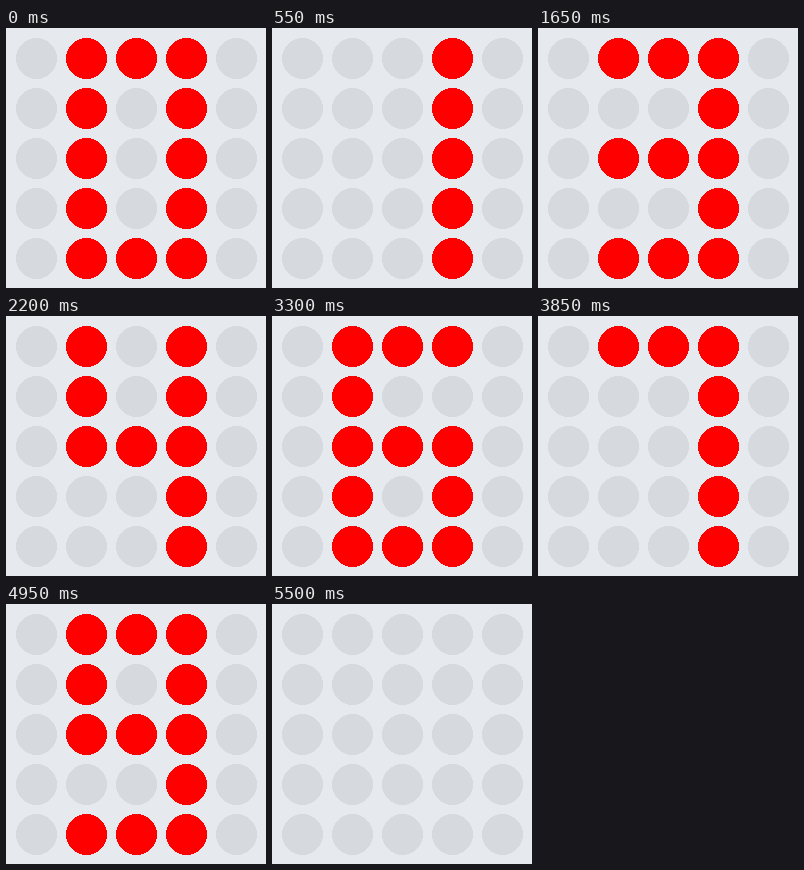
Animation, 260 px wide and 260 px high, one loop 6600 ms. Source, as an HTML page with a canvas:

```html
<!DOCTYPE html>
<html lang="en">
<head>
<meta charset="utf-8">
<title>Dot matrix counter</title>
<style>
  html, body { margin: 0; width: 100%; height: 100%; overflow: hidden; background: #e6e9ee; }
  canvas { display: block; width: 260px; height: 260px; }
</style>
</head>
<body>
<canvas id="stage" width="260" height="260"></canvas>
<script>
const ctx = document.getElementById('stage').getContext('2d');
const BACK = '#e6e9ee', OFF = '#d6d9de', ON = '#ff0000';
const STEP = 550, LOOP = 6600;
const GRID = 5, PITCH = 50, FIRST = 30, REACH = 20;

// Five rows per digit, three bits each for the middle columns.
const DIGITS = ['75557', '11111', '71747', '71717', '55711',
                '74717', '74757', '71111', '75757', '75717'];
const BLANK = '00000';

// Crisp disc, 41 pixels across.
function dot(cx, cy, color) {
  ctx.fillStyle = color;
  for (let dy = -REACH; dy <= REACH; dy++) {
    const half = Math.floor(Math.sqrt((REACH + 0.5) ** 2 - dy * dy));
    ctx.fillRect(cx - half, cy + dy, 2 * half + 1, 1);
  }
}

function draw(rows) {
  ctx.fillStyle = BACK;
  ctx.fillRect(0, 0, 260, 260);
  for (let row = 0; row < GRID; row++) {
    const bits = Number(rows[row]) << 1;
    for (let col = 0; col < GRID; col++) {
      const lit = bits >> (GRID - 1 - col) & 1;
      dot(FIRST + col * PITCH, FIRST + row * PITCH, lit ? ON : OFF);
    }
  }
}

const start = performance.now();

function tick() {
  const time = (performance.now() - start) % LOOP;
  draw(DIGITS[Math.floor(time / STEP)] || BLANK);
  requestAnimationFrame(tick);
}

tick();
</script>
</body>
</html>
```
